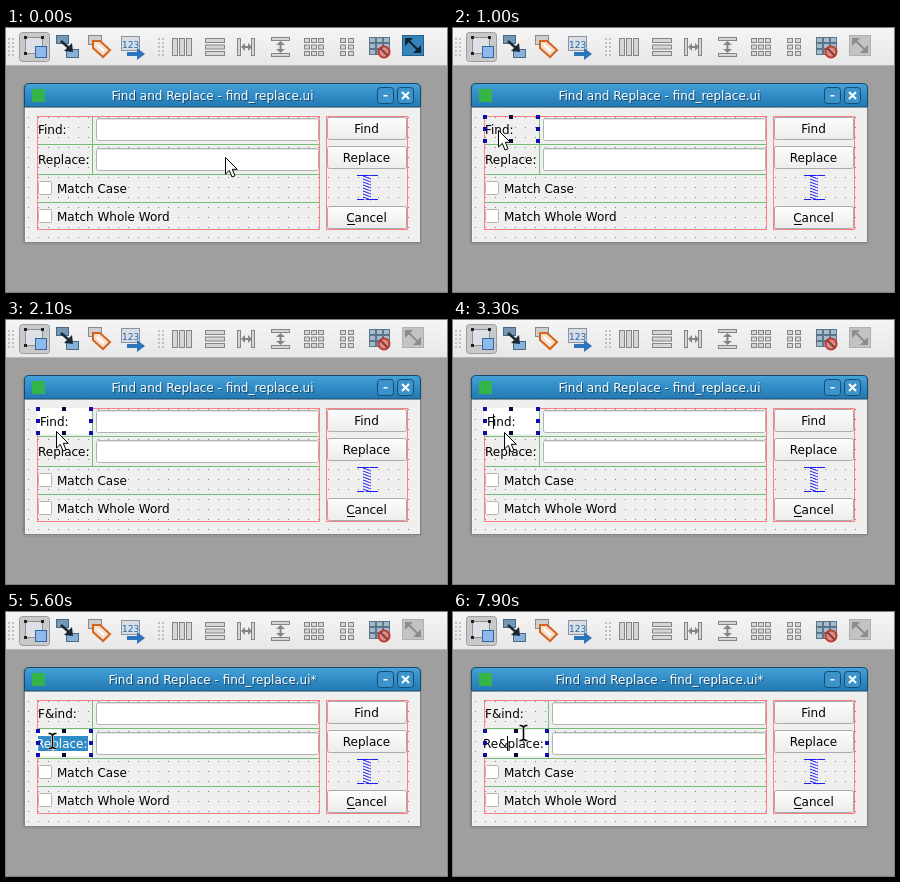
An HTML page that plays this animation: 441x264 px, repeating every 8 s.

```html
<!DOCTYPE html>
<html lang="en">
<head>
<meta charset="utf-8">
<title>Form editor</title>
<style>
html, body { margin: 0; width: 100%; height: 100%; overflow: hidden; background: #9f9f9f; }
svg { display: block; width: 441px; height: 264px; }
text { font: 12px "DejaVu Sans", sans-serif; white-space: pre; }
</style>
</head>
<body>
<svg id="stage" viewBox="0 0 441 264" xmlns="http://www.w3.org/2000/svg"></svg>
<script>
const LOOP = 8000;
const stage = document.getElementById('stage');

const rect = (x, y, w, h, fill, extra = '') =>
  `<rect x="${x}" y="${y}" width="${w}" height="${h}" fill="${fill}" ${extra}/>`;
const frame = (x, y, w, h, fill, stroke, r = 0) =>
  rect(x + .5, y + .5, w - 1, h - 1, fill, `stroke="${stroke}" rx="${r}"`);
const path = (d, stroke, width = 1, fill = 'none') =>
  `<path d="${d}" stroke="${stroke}" stroke-width="${width}" fill="${fill}"/>`;
const shape = (d, fill) => `<path d="${d}" fill="${fill}"/>`;
const label = (x, y, s, extra = '') => `<text x="${x}" y="${y}" ${extra}>${s}</text>`;
const repeat = (n, fn) => Array.from({ length: n }, (_, i) => fn(i)).join('');
const hline = (x, y, w, c) => rect(x, y, w, 1, c);
const vline = (x, y, h, c) => rect(x, y, 1, h, c);

const GREY = '#858585', PALE = '#d6d6d6', RED = '#ff8080', GREEN = '#76bd76', BLUE = '#1c1cf0';

const cells = (x, y, cols, rows, w, h, dx, dy, fill = PALE, stroke = GREY) =>
  repeat(cols * rows, i => frame(x + (i % cols) * dx, y + Math.floor(i / cols) * dy, w, h, fill, stroke));
const gripper = x => repeat(10, i => rect(x + (i % 2) * 4, 10 + Math.floor(i / 2) * 4, 2, 2, '#c2c2c2'));

function toolbar() {
  return rect(0, 0, 441, 38, 'url(#bar)') + hline(0, 37, 441, '#b8b8b8') + gripper(2) +
    // edit widgets
    frame(13, 4, 31, 30, '#c9c9c9', '#9c9c9c', 3) +
    frame(19, 9, 18, 17, '#dde1e6', '#8b9199') +
    [18, 35].map(x => [8, 24].map(y => rect(x, y, 3, 3, '#222')).join('')).join('') +
    frame(29, 18, 12, 12, '#8db9ec', '#35669d') +
    // signals
    frame(50, 7, 13, 9, '#7597b4', '#496a86') + frame(60, 21, 13, 9, '#86b1d8', '#496a86') +
    path('M55 13L63 20', '#1c2730', 2.500) + shape('M67 24L58 23L66 15Z', '#1c2730') +
    // buddies
    frame(82, 7, 14, 10, '#cfcfcf', '#8a8a8a') +
    path('M87 13H94L104 22L97 29L87 20Z', '#d3641d', 2, '#f7dfcf') + path('M91 17L98 23', '#fff', 2) +
    // tab order
    frame(115, 8, 19, 15, '#d9dee4', '#8a949e') +
    label(116, 20, '123', 'fill="#1f66ae" style="font-size:9px"') +
    path('M121 26H133', '#2d74b8', 4) + shape('M131 20L139 26L131 32Z', '#2d74b8') +
    gripper(152) +
    // layouts
    cells(166, 10, 3, 1, 6, 18, 7, 0) + cells(199, 10, 1, 3, 20, 5, 0, 6.500) +
    cells(231, 10, 2, 1, 4, 18, 14, 0) + path('M237 19H244', GREY, 2) +
    shape('M235 19L239 15V23ZM246 19L242 15V23Z', GREY) +
    cells(265, 9, 1, 2, 19, 4, 0, 16) + path('M274.500 15V23', GREY, 2) +
    shape('M274.500 13L270 17H279ZM274.500 25L270 21H279Z', GREY) +
    cells(298, 10, 3, 3, 6, 5, 7, 6.500) + cells(334, 10, 2, 3, 6, 5, 8, 6.500) +
    // break layout
    cells(363, 9, 3, 3, 7, 6, 7, 6, '#a5bacb', '#5c7487') +
    '<circle cx="378" cy="24" r="5.500" fill="#d88d88" stroke="#bd3a33" stroke-width="2"/>' + path('M374 20L382 28', '#8f3935', 2);
}

const adjustIcon = (fill, edge, arrow) => frame(396, 7, 22, 21, fill, edge) +
  path('M402 12L412 22', arrow, 2) + shape('M399 10H407L399 18ZM415 25H407L415 17Z', arrow);

const button = (y, s) => frame(321, y, 80, 23, 'url(#btn)', '#ababab', 2) +
  label(360.500, y + 15.500, s, 'text-anchor="middle"');

function dialog() {
  return rect(16, 57, 400, 160, '#000', 'opacity=".06" rx="4"') + rect(17, 56, 398, 159, '#000', 'opacity=".1" rx="4"') +
    frame(18, 70, 397, 145, '#efefef', '#858585') +
    path('M18.500 79V60Q18.500 55.500 23 55.500H410Q414.500 55.500 414.500 60V79Z', '#174a6d', 1, 'url(#title)') +
    rect(26, 61, 13, 13, '#35b44a') +
    [371, 391].map(x => frame(x, 59, 17, 17, '#3c93cb', '#164c72', 3)).join('') +
    rect(377.500, 67, 4, 1.500, '#fff') + path('M396 64L403 71M403 64L396 71', '#fff', 2) +
    rect(22, 79, 389, 132, 'url(#dots)');
}

function formBase() {
  const coil = (i, from, to, c) => path(`M${from} ${148 + i * 3}L${to} ${151 + i * 3}`, c);
  return frame(31, 88, 283, 114, 'none', RED) +
    [116, 146, 174].map(y => hline(32, y, 281, GREEN)).join('') +
    frame(320, 88, 82, 114, 'none', RED) +
    [153, 181].map(y => frame(32, y, 14, 14, '#fff', '#b5b5b5', 1)).join('') +
    label(51, 165, 'Match Case') + label(51, 193, 'Match Whole Word') +
    button(89, 'Find') + button(118, 'Replace') + button(178, 'Cancel') + hline(341, 196, 8, '#000') +
    hline(351, 147, 21, BLUE) + hline(351, 171, 21, BLUE) +
    repeat(8, i => coil(i, 364, 358, '#fff') + coil(i, 357, 365, BLUE));
}

stage.innerHTML = `<defs>
  <linearGradient id="bar" x2="0" y2="1"><stop stop-color="#f5f5f5"/><stop offset="1" stop-color="#e7e7e7"/></linearGradient>
  <linearGradient id="title" x2="0" y2="1"><stop stop-color="#47a2d9"/><stop offset=".5" stop-color="#318cc6"/><stop offset="1" stop-color="#2478af"/></linearGradient>
  <linearGradient id="btn" x2="0" y2="1"><stop stop-color="#fdfdfd"/><stop offset="1" stop-color="#ececec"/></linearGradient>
  <pattern id="dots" x="22" y="79" width="10" height="10" patternUnits="userSpaceOnUse"><rect width="1" height="1" fill="#858585"/></pattern>
  <clipPath id="editClip"><rect x="31" y="86" width="64" height="62"/></clipPath>
</defs>
${rect(0, 0, 441, 264, '#9f9f9f')}${toolbar()}
<g id="adjust"></g>${dialog()}
<g id="caption" text-anchor="middle"></g>
${formBase()}<g id="form"></g><g id="pointer"></g>`;

const [adjust, caption, form, pointer] =
  ['adjust', 'caption', 'form', 'pointer'].map(id => document.getElementById(id));

const ARROW = path('M.5 .5V17L4.300 13.400L7 20L10 18.800L7.300 12.300H12.300Z', '#000', 1, '#fff');
const BEAM_D = 'M-3.500 -7.500H-1.500L.5 -6L2.500 -7.500H4.500M.5 -6V6M-3.500 7.500H-1.500L.5 6L2.500 7.500H4.500';
const BEAM = path(BEAM_D, '#fff', 3) + path(BEAM_D, '#000', 1.600);

// time, x, y, text cursor
const moves = [
  [0, 219, 129], [200, 190, 127], [300, 132, 120], [400, 78, 113], [500, 51, 110], [600, 47, 105], [700, 45, 102],
  [1100, 45, 102, 1], [1500, 38, 106, 1], [1800, 40, 107, 1], [1900, 43, 108, 1], [2000, 47, 110, 1],
  [2100, 50, 111], [2200, 51, 112], [4100, 50, 119], [4200, 48, 128],
  [5000, 48, 128, 1], [5300, 47, 127, 1], [5600, 46, 129, 1],
  [5900, 50, 131, 1], [6000, 57, 134, 1], [6100, 61, 136, 1], [7800, 66, 128, 1], [7900, 70, 121, 1]
];
const between = (t, a, b) => t >= a && t < b;
const at = (list, t) => list.filter(m => m[0] <= t).pop();

function handles(y, w) {
  const xs = [30, Math.round(27.500 + w / 2), 26 + w], ys = [y, y + 12, y + 24];
  return ys.map((hy, j) => xs.map((hx, i) =>
    i === 1 && j === 1 ? '' : rect(hx, hy, 4, 4, i === 1 ? '#08083a' : '#0c0cb0')).join('')).join('');
}

function editor(x, y, w, s, textWidth, selected, caretX) {
  const left = Math.max(x, 32);
  return rect(31, y + 1, w - 2, 26, '#fff') +
    (selected ? rect(left, y + 7, x + textWidth - left, 15, '#308cc6') : '') +
    `<g clip-path="url(#editClip)">${label(x, y + 19, s, `fill="${selected ? '#fff' : '#000'}"`)}</g>` +
    (caretX ? vline(caretX, y + 7, 15, '#000') : '');
}

function draw(t) {
  const changed = t >= 3800, column = t >= 7400 ? 96 : 87;
  const findText = changed ? 'F&amp;ind:' : 'Find:';
  const replaceText = t >= 7400 ? 'Re&amp;place:' : 'Replace:';
  const width = column - 30;

  adjust.innerHTML = t < 900
    ? adjustIcon('#3583b8', '#25608f', '#10242f')
    : adjustIcon('#c3c3c3', '#b0b0b0', '#8c8c8c');
  const title = 'Find and Replace - find_replace.ui' + (changed ? '*' : '');
  caption.innerHTML = label(207.500, 73, title, 'fill="#174a6d"') + label(206.500, 72, title, 'fill="#fff"');

  let out = vline(column - 1, 89, 57, GREEN) +
    [90, 120].map(y => frame(column + 3, y, 310 - column, 23, '#fff', '#b2b2b2', 2) +
      hline(column + 5, y + 1, 306 - column, '#e3e3e3')).join('');

  if (between(t, 1100, 4800)) {
    const caretX = between(t, 2200, 2700) || between(t, 3300, 3800) ? 40 : between(t, 3800, 4400) ? 50 : 0;
    out += editor(34, 87, width, findText, 30, t < 1600, caretX);
  } else out += label(32, 106, findText);

  if (t >= 5000) {
    const selected = t < 5300 || between(t, 5500, 5800);
    const caretX = between(t, 5300, 5500) || between(t, 5800, 5900) || between(t, 6400, 6900) ? 45 : t >= 7400 ? 54 : 0;
    out += editor(30, 117, width, replaceText, 52, selected, caretX);
  } else out += label(32, 136, replaceText);

  if (between(t, 900, 4800)) out += handles(87, width);
  if (t >= 4800) out += handles(117, width);
  form.innerHTML = out;

  const [, x, y, beam] = at(moves, t);
  pointer.setAttribute('transform', `translate(${x} ${y})`);
  pointer.innerHTML = beam ? BEAM : ARROW;
}

const start = performance.now();
let shown = -1;
function tick() {
  const t = Math.floor((performance.now() - start) % LOOP / 100) * 100;
  if (t !== shown) draw(shown = t);
  requestAnimationFrame(tick);
}
tick();
</script>
</body>
</html>
```
